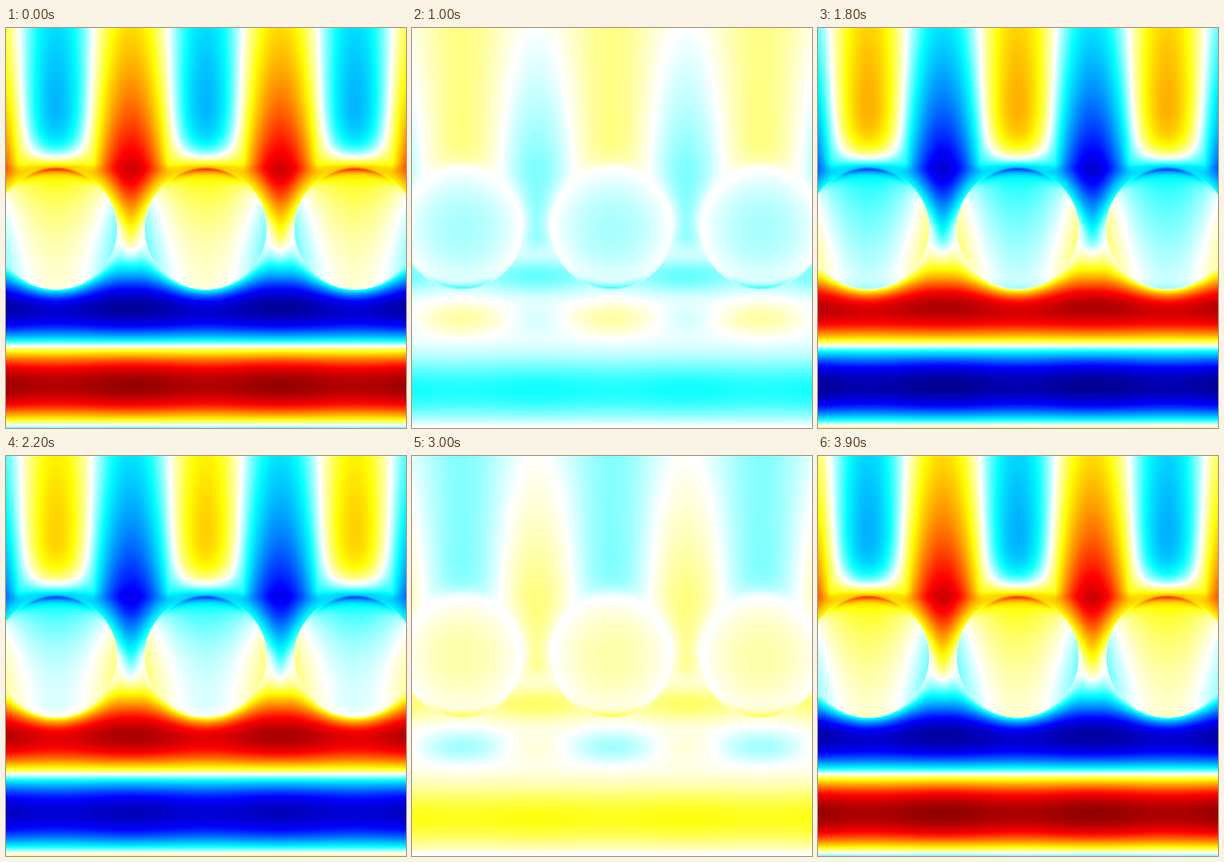
Recreate the animation shown at these times as a matplotlib script. Size 400 px wide and 400 px high, loop 4000 ms.

```python
import numpy as np
import matplotlib.pyplot as plt
from matplotlib.animation import FuncAnimation
from matplotlib.colors import LinearSegmentedColormap

SIZE, FRAMES, STEP = 400, 40, 100
PITCH, MID_X, MID_Y, RADIUS = 149.5, 199.7, 200.5, 61
TOP = MID_Y - RADIUS          # height of the rods' upper edge
CREST, NODE, HALF = 278.5, 318, 79  # standing wave below the rods

pixel = np.arange(SIZE) + 0.5
x, y = np.meshgrid(pixel, pixel)
dx = np.abs((x - MID_X + PITCH / 2) % PITCH - PITCH / 2)
dy = y - MID_Y
r = np.hypot(dx, dy)
c = np.cos(2 * np.pi * dx / PITCH)   # 1 on a rod's axis, -1 between rods
gap = PITCH / 2 - dx
outside = np.maximum(r - RADIUS, 0)
inside = np.clip(RADIUS - r + 0.5, 0, 1)


def bell(value, width, power=2):
    return np.exp(-(np.abs(value) / width) ** power)


def blend(a, b, start, end):
    """Ease from a to b between two heights."""
    t = np.clip((y - start) / (end - start), 0, 1)
    t = t * t * (3 - 2 * t)
    return a * (1 - t) + b * t


def rim(side):
    """Crescent just inside a rod: side -1 is the top, 1 the bottom."""
    facing = np.clip(side * dy / np.maximum(r, 1), 0, 1)
    return facing ** 6 * bell(RADIUS - 2 - r, 3.5, 1)


def cos_part():
    rise = np.minimum(y - TOP, 0)
    above = (0.65 * np.exp(rise / 60) - 0.06
             - 1.75 * c * np.exp(rise / 175)
             + 2.1 * np.maximum(c, 0) * np.exp(rise / 18))

    depth = np.maximum(y - TOP, 0)
    width = np.maximum(32 - 0.37 * depth, 9)
    between = (2.4 * bell(depth, 50, 1.5) * bell(gap, width)
               + 0.45 * (1 + c) * bell(depth, 25))

    wave = np.where(y < CREST, -bell(CREST - y, 35, 1.7),
                    np.sin(np.pi * (y - NODE) / HALF))
    wave = 2.7 * wave * (1 - 0.04 * c) * (1 - 0.8 * bell(outside, 9, 1))
    outer = blend(above, between, TOP - 5, TOP + 7) + wave

    inner = (0.62 * np.exp((145 - y) / 60) - 0.38 * (dx / 50) ** 2
             + 1.1 * rim(-1))
    return outer * (1 - inside) + inner * inside


def sin_part():
    above = (0.14 * np.maximum(1 - y / 150, 0)
             + 0.3 * c * np.exp((np.minimum(y, TOP) - 130) / 180))
    above = above * (1 - bell(outside, 9, 1) * np.clip(0.9 - dy / 60, 0, 1))

    band = np.where(y < 362, bell(y - 362, 32),
                    np.cos(np.pi / 2 * (y - 362) / 37))
    below = ((0.09 * c - 0.27) * bell(y - 248, 18)
             + (0.07 + 0.15 * c) * bell(y - 291, 16)
             - (0.54 - 0.02 * c) * band)
    outer = blend(above, below, 205, 235)

    inner = -0.2 * np.clip(1 - (r / 57) ** 2, 0, 1) - 0.45 * rim(1)
    return outer * (1 - inside) + inner * inside


wave_cos, wave_sin = cos_part(), sin_part()

cmap = LinearSegmentedColormap.from_list("field", [
    (0, (0, 0, 0.5)), (1 / 6, (0, 0, 1)), (0.4, (0, 1, 1)), (0.5, (1, 1, 1)),
    (0.6, (1, 1, 0)), (5 / 6, (1, 0, 0)), (1, (0.5, 0, 0))], N=512)

fig = plt.figure(figsize=(4, 4), dpi=100)
ax = fig.add_axes([0, 0, 1, 1])
ax.axis("off")
image = ax.imshow(wave_cos, cmap=cmap, vmin=-3, vmax=3,
                  interpolation="nearest", aspect="auto")


def update(n):
    phase = 2 * np.pi * n / FRAMES
    image.set_data(wave_cos * np.cos(phase) + wave_sin * np.sin(phase))
    return (image,)


anim = FuncAnimation(fig, update, frames=FRAMES, interval=STEP,
                     repeat=True, repeat_delay=0, blit=False)
plt.show()
```
